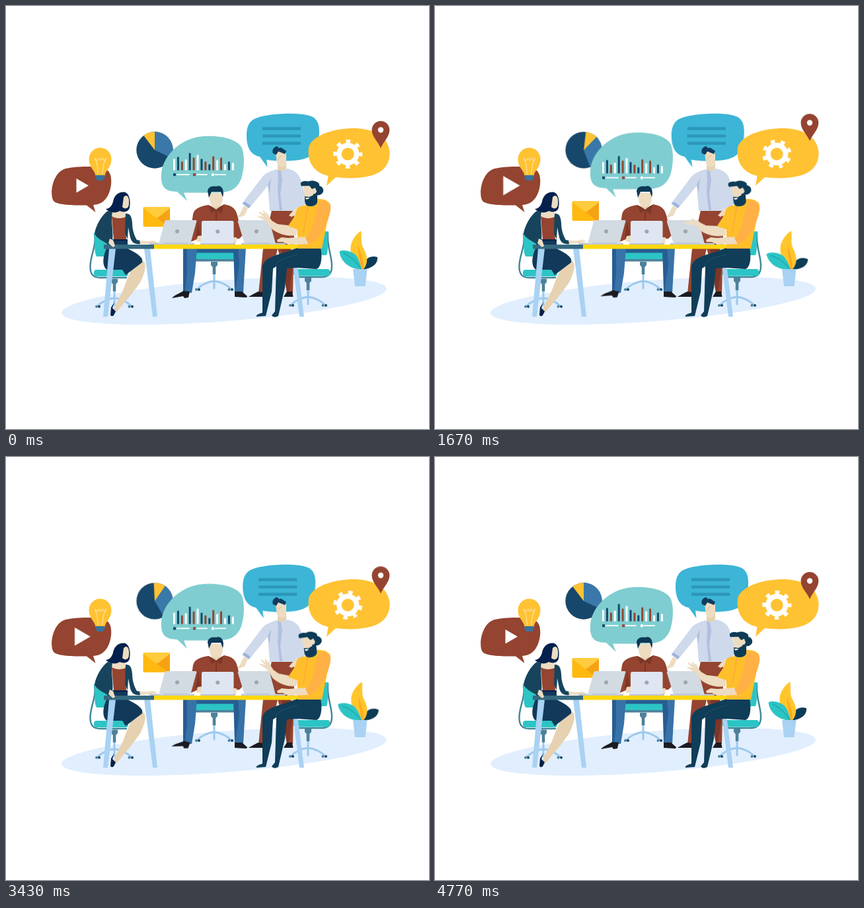
Animation, 640 px wide and 640 px high, one loop 4810 ms. Source, as an HTML page:

```html
<!DOCTYPE html>
<html lang="en">
<head>
<meta charset="utf-8">
<title>Team meeting</title>
<style>
html, body { margin: 0; width: 100%; height: 100%; overflow: hidden; background: #fff; }
svg { display: block; width: 100%; height: 100%; }
:root {
  --loop: 4810ms;
  --sine: cubic-bezier(.364, 0, .636, 1);
}
.sway, .drift, .nod, .arm, .finger { transform-box: view-box; }
.sway { animation: sway var(--loop) var(--sine) infinite; }
.drift { animation: drift var(--loop) var(--sine) infinite; }
.nod { animation: sway calc(var(--loop) / 2) var(--sine) infinite; }
.arm { transform-origin: 440px 344px; animation: arm var(--loop) ease-in-out infinite; }
.finger { transform-origin: 401px 325px; animation: pinch var(--loop) ease-in-out infinite; }
.rays line { stroke-dasharray: 1 2; animation: rays var(--loop) linear infinite; }
@keyframes sway { 50% { transform: var(--to); } }
@keyframes drift { 53% { transform: var(--to); } }
@keyframes arm {
  0%, 100% { transform: rotate(0deg); }
  22%, 46% { transform: rotate(-4deg); }
  60%, 72% { transform: rotate(5deg); }
  87% { transform: rotate(2.5deg); }
}
@keyframes pinch {
  0%, 10%, 60%, 100% { transform: rotate(0deg); }
  22%, 47% { transform: rotate(var(--fold)); }
}
@keyframes rays {
  0%, 37% { stroke-dashoffset: 1; opacity: 0; }
  37.1% { stroke-dashoffset: 1; opacity: 1; }
  43%, 50% { stroke-dashoffset: 0; opacity: 1; }
  56.9% { stroke-dashoffset: -1; opacity: 1; }
  57%, 100% { stroke-dashoffset: -1; opacity: 0; }
}
.red { fill: #944430; } .navy { fill: #17476a; } .ink { fill: #04214d; }
.gold { fill: #ffc233; } .skin { fill: #eddcc1; } .tan { fill: #e6d2b1; }
.teal { fill: #2cc4c5; } .sky { fill: #a9d2f3; } .shirt { fill: #ced9ec; }
.denim { fill: #3772a8; } .shade { fill: #275d92; } .white { fill: #fff; } .shoe { fill: #1b1b22; }
.line { fill: none; stroke-linecap: round; stroke-linejoin: round; }
</style>
</head>
<body>
<svg viewBox="0 0 640 640" preserveAspectRatio="none">
<defs>
  <g id="base">
    <path class="line" stroke="#9cc9ed" stroke-width="3" d="M0 -41V-2M0 -13C-10 -12 -21 -6 -25 -1M0 -13C10 -12 21 -6 25 -1"/>
    <path fill="#4d819b" d="M-5 -42H5V-37L2.3 -34V-23H-2.3V-34L-5 -37Z"/>
    <g class="navy"><circle cx="-23" r="2"/><circle cx="27" r="2"/></g>
    <g fill="#4d819b"><circle cx="-27" r="2"/><circle cx="22.500" r="2"/></g>
  </g>
</defs>

<ellipse fill="#e1eefe" cx="330" cy="446" rx="246.500" ry="31" transform="rotate(-4.300 330 446)"/>

<!-- pie -->
<g class="sway" style="--to:rotate(56deg);transform-origin:225px 218px">
  <circle class="navy" cx="225" cy="218" r="27.700"/>
  <path fill="#3a78a9" d="M225 218V190.300A27.700 27.700 0 0 1 250 229.800Z"/>
  <path class="gold" d="M225 218L208.300 195.900A27.700 27.700 0 0 1 225 190.300Z"/>
</g>

<!-- text bubble -->
<g class="drift" style="--to:translateX(-8.500px)">
  <path fill="#3cb5d6" d="M373 172.500C386 163 441 159 462 167C475 172 475 188 473 203C470 222 462 231 439 233.500C424 235 408 235 394 232.500L395.500 244L384 228C369 225 364 212 364 196C364 186 366 178 373 172.500Z"/>
  <path stroke="#2b97ba" stroke-width="4.400" d="M388 185.500h58M388 196.600h58M388 207.700h58"/>
</g>

<!-- chart bubble -->
<path class="drift" style="--to:translateY(-7.300px)" fill="#7fcdd0" d="M291 198C318 194 350 200 357 215C362 229 360 248 356 261C350 276 341 282 320 282.500H269L274 295L259 281C240 281 234 273 235 255C236 228 262 203 291 198Z"/>
<g class="drift" style="--to:translateY(6.300px)">
  <g id="bars"></g>
  <path stroke="#fff" stroke-width="1.800" d="M258.500 255.200h19M288.500 255.200h16M316 255.200h17"/>
  <path class="navy" d="M253 253.200h4v4h-4z"/><path class="red" d="M283 253.200h4v4h-4z"/><path class="white" d="M311 253.200h4v4h-4z"/>
</g>

<!-- video bubble -->
<path class="red" d="M90 246C108 242 143 241 154 249C162 256 160 276 154 287C149 296 143 300 132 301L135.500 312L122 301.500C104 302 80 301 73 296C65 289 69 252 90 246Z"/>
<path class="white sway" style="--to:scale(1.460);transform-origin:115.500px 271.700px" d="M106.500 261L125 271.700L106.500 282.500Z"/>

<!-- bulb -->
<g class="rays line" stroke="#ffc02e" stroke-width="2.300" id="rays"></g>
<path class="gold" d="M135.500 257C135 249 125.500 245 125.500 231.500A17 17 0 0 1 159.500 231.500C159.500 245 150 249 149.500 257Z"/>
<path class="line" stroke="#ffe49b" stroke-width="1.100" d="M139.500 254L138 240L134.500 230L138 234L141 230L143.500 234L146 230L149 234L151.500 230L147.500 240L145.500 254"/>
<path fill="#3b719b" d="M135.500 256h14v4l-2.500 4h-9l-2.500 -4z"/>

<!-- settings bubble -->
<path class="gold" d="M458 214C461 200 484 188 516 185.500C546 183 578 192 580.500 221C581 241 570 254 544 258.500C531 261 512 261 499 259L485 272L487.500 257C466 252 455 236 458 214Z"/>
<g class="sway" fill="none" style="--to:rotate(90deg);transform-origin:517.200px 224px" stroke="#fff">
  <circle cx="517.200" cy="224" r="13.300" stroke-width="7.600"/>
  <circle cx="517.200" cy="224" r="18.700" stroke-width="6.600" stroke-dasharray="6.200 8.487" stroke-dashoffset="3.100"/>
</g>
<g class="sway" style="--to:translateY(-13.800px)">
  <path class="red" d="M567 215C563 205 553.500 198 553.500 187.500A13.300 13.300 0 0 1 580.300 187.500C580.300 198 571 205 567 215Z"/>
  <circle class="white" cx="567" cy="187.500" r="4.200"/>
</g>

<!-- envelope -->
<g class="drift" style="--to:translateY(-12.200px)">
  <rect x="207.500" y="304" width="40.500" height="30" rx="2" fill="#ffb90f"/>
  <path fill="#f6a313" d="M228 321L248 306V333L245 334Z"/>
  <path fill="#ffcc3d" d="M208 305.500Q208 304 210 304H246Q248 304 248 306L231 319Q228 321.500 225 319Z"/>
</g>

<!-- chairs -->
<use href="#base" x="164" y="454.800"/>
<use href="#base" x="457" y="453"/>
<use href="#base" x="315" y="429"/>
<g class="line" stroke="#3f8698" stroke-width="2.400">
  <path d="M134 345C137 364 128 376 127.500 393C127 407 133 411 142 411H182"/>
  <path d="M487 343C485 363 493 377 493 393C493 406 487 410 478 410H440"/>
</g>
<path class="teal" d="M133 344Q134 342 140 344L161 350L166 379H137C132 370 136 356 133 344Z"/>
<path class="teal" d="M474 345L480 341H488C485 355 489 367 485 377H470Z"/>
<rect class="teal" x="133" y="399" width="52" height="10" rx="4"/>
<rect class="teal" x="435" y="398" width="55" height="10.500" rx="4"/>

<!-- standing man -->
<g>
  <path class="red" d="M402 309H436V352L434 434H425L416 385L411 367L403 402L389 435H382L389 367Z"/>
  <path fill="#7d3627" d="M417 368H434L433 400L428 432H425Z"/>
  <path class="shoe" d="M367 440C372 437 379 433 382 432L389 433V440ZM420 440L425 432H433L434.500 440Z"/>
  <path class="tan" d="M411 236H424V252H411Z"/>
  <path class="shirt" d="M409 247L416 250L426 246C437 249 443 253 446 263L456 297L440 312L434 306L437 310H399L396 272L368 306L357 299L386 261C391 253 400 250 409 247Z"/>
  <path fill="#b1c0df" d="M411 248L416 250L418 263L415 285L418 309H414L411 280L412 260ZM396 271L401 260L399 283Z"/>
  <path fill="#9db3da" d="M358 299L361 296L370 302L367 306Z"/>
  <path class="skin" d="M360 302L366 306L361 317L355 319L349 321L343 320L353 316Z"/>
  <path class="skin" d="M440 304L447 309L440 315L432 319L428 317L435 309Z"/>
  <path class="skin" d="M407 222C410 218 421 217 424 224V237C423 245 414 245 411 240C408 233 410 228 407 222Z"/>
  <path class="line" stroke="#d9bb91" d="M417 227Q412 228 412 232"/>
  <path fill="#113d60" d="M404 223C402 217 405 214 410 212L413 215C418 213 420 218 424 219L422 224L412 220L409 225Z"/>
</g>

<!-- seated man, middle -->
<g>
  <path class="shade" d="M284 366H348V375H284Z"/>
  <rect class="teal" x="285" y="373.500" width="62" height="10.500" rx="3"/>
  <path fill="#4d819b" d="M287 383h58v3.500h-58z"/>
  <path class="denim" d="M268 365H289L286 404L281 434L268 433Z"/>
  <path class="shade" d="M268 366H274L274 404L271 433H268Z"/>
  <path class="denim" d="M344 365H363L359 434H346Z"/>
  <path class="shade" d="M344 367L351 366L353 390L347 433Z"/>
  <path class="shoe nod" style="--to:rotate(9deg);transform-origin:278px 437px" d="M251 442C255 437 265 434 268 431L278 432L276 441L270 442L268 439Z"/>
  <path class="shoe" d="M346 440V432H357L365 439Q365 441 362 441Z"/>
  <path class="red" d="M306 301L318 307L330 300C342 302 348 307 350 317L358 347L353 352H291L277 358L283 315C285 306 294 303 306 301Z"/>
  <path fill="#7d3627" d="M306 301L318 307L329 301L326 314L318 309L311 313ZM317 309h2v17h-2zM287 350L291 324L295 350Z"/>
  <path class="tan" d="M311 294H325V302L318 308L311 303Z"/>
  <path class="skin" d="M306 283H329L327 297C325 306 310 306 309 297Z"/>
  <path fill="#0d3856" d="M307 290L305 280C306 273 313 272 318 273C326 270 331 278 328 289L325 281H311Z"/>
  <path class="skin" d="M290 348L298 347V358L288 356ZM344 350H349L348 359H342Z"/>
</g>

<!-- seated woman -->
<g>
  <path class="tan" d="M193 391L208 386C214 391 209 407 203 418C194 432 180 448 170 460L163 466C162 455 170 445 177 430C181 418 187 404 193 391Z"/>
  <path class="ink" d="M164 448L161 457L166 462L163 468Q159 471 158 467L159 456Z"/>
  <path fill="#12395a" d="M154 354H184V367C197 374 209 380 206 388L181 407L176 399H153C146 395 145 381 153 365Z"/>
  <path class="red" d="M160 318L181 316L182 354H163Z"/>
  <path class="skin" d="M168 304H180L181 319C175 322 166 322 160 318L162 312Z"/>
  <path fill="#17445c" d="M154 310L161 312C158 324 163 340 161 354L153 357L149 342L159 354L155 361C146 355 136 351 134 344C136 332 145 316 154 310ZM181 314C188 314 190 318 191 328C191 340 195 349 198 354L204 355L203 360C195 361 190 358 188 350L185 335L184 353L180 344Z"/>
  <path class="ink" d="M161 353h23v2.200h-23z"/>
  <path class="ink" d="M179 281.500C168 281 163 289 162 296C160 303 156 307 151 307C156 313 167 314 172 310C176 312 185 313 187 305C189 296 187 283 179 281.500Z"/>
  <path class="skin" d="M178 289C184 283 187 291 186 299C186 307 180 308 176 304Z"/>
</g>

<!-- table -->
<path class="sky" d="M156 367H166L154 470H147ZM209 367H218L229 470H222ZM431 367H438L451 470H444Z"/>
<path fill="#35697f" d="M148 361h76v6.500h-76z"/>
<path fill="#ffd80e" d="M224 361h217v6.500h-217z"/>
<path class="skin" d="M157 352L162 354L165 363L162 365L155 359Z"/>
<path class="skin sway" style="--to:rotate(-5deg);transform-origin:201px 358px" d="M202 355L214 356L223 355L230 358L220 360H203Z"/>

<!-- laptops -->
<path fill="#bcc4d0" d="M216 358.500H285V361H218ZM294 358.500H347V361H294ZM356 358.500H424L422 361H356Z"/>
<path fill="#d2dae2" d="M243 324H287Q289 324 288 327L279 360H231L240 326Q241 324 243 324ZM353 324H396Q398 324 399 326L408 360H361L351 327Q350 324 353 324Z"/>
<path fill="#b7c1cf" d="M238 358h37v1.200h-37zM363 358h37v1.200h-37z"/>
<rect x="296" y="325" width="48.500" height="33.500" rx="2.500" fill="#dfe6f2"/>
<g fill="#9fa5ae"><circle cx="259" cy="341" r="3"/><circle cx="320.300" cy="341.300" r="3"/><circle cx="379" cy="341" r="3"/></g>

<!-- seated man, right -->
<g>
  <path fill="#103d58" d="M441 366H476C479 380 477 397 469 398L440 396L425 397L422 426L412 469Q405 473 402 468L407 462L409 394L404 397L402 432L393 469L379 470Q377 467 388 464V395C389 381 409 377 424 372Z"/>
  <path class="line" stroke="#2a5871" stroke-width=".8" d="M408 394C409 384 425 380 441 376"/>
  <path class="skin" d="M450 289H468V305L455 302Z"/>
  <g class="arm">
    <path class="skin" d="M399 323L411 330L428 332L441 337L440 347C427 349 414 346 403 338L395 327Z"/>
    <path class="skin finger" style="--fold:-20deg" d="M401 323L391 319L381 317.500L382 319.500L391 324L398 330Z"/>
    <path class="skin finger" style="--fold:-34deg" d="M402 324L393 316L383.500 311L383 313L391 320L398 328Z"/>
    <path class="skin finger" style="--fold:-44deg" d="M402 325L395 316L390 309.500L388.500 310L392 318L398 327Z"/>
    <path class="skin finger" style="--fold:-30deg" d="M400 328L398 318L395 313L393.500 314L395 321Z"/>
  </g>
  <path fill="#ffbf2b" d="M452 302C457 295 466 291 474 292C484 292 491 297 491 302L478 367H441V338L427 333C431 325 438 319 440 308C442 304 446 302 452 302Z"/>
  <path fill="#ffae36" d="M455 305L458 303L451 343H449Z"/>
  <path class="skin" d="M457 349L440 350L427 351L417 350L410 354L411 357L419 357L427 361L459 360Z"/>
  <path fill="#ffb145" d="M476 295C486 293 493 300 491 309C488 326 480 342 470 353L458 361L453 351C464 343 467 316 471 301Z"/>
  <g class="nod" style="--to:rotate(-6.500deg);transform-origin:462px 301px">
    <path class="skin" d="M450 273C457 268 467 272 470 278L468 293H453Z"/>
    <path fill="#0e3b57" d="M447 272.500Q444 267 449 265.500Q453 264 457 265.500Q465 263 470 266Q475 268 474 272Q481 274 480 281Q477 287 471 286V297Q469 303 460 303Q452 303 452 294V288L459 289L465 286V279L469 279L468 275L463 277L459 272Z"/>
    <path fill="#fff" d="M453 290H459Q458 293 454 292.500Z"/>
    <path class="skin" d="M465 278Q469 276 470 280Q469 285 465 284Z"/>
  </g>
</g>

<!-- plant -->
<path class="sway" style="--to:rotate(10deg);transform-origin:540px 398px" fill="#0d3c56" d="M539 399C540 386 548 376 562 380C563 391 553 397 539 399Z"/>
<g class="sway" style="--to:rotate(2.500deg);transform-origin:537px 398px">
  <path fill="#ffc62c" d="M536 399C525 387 518 371 523 358C527 348 532 344 537 340C539 349 536 358 541 367C548 379 548 391 540 399Z"/>
  <path fill="#ffa91f" d="M538 399C537 386 531 373 533 362C535 373 543 385 540 399Z"/>
</g>
<g class="sway" style="--to:rotate(-9deg);transform-origin:537px 398px">
  <path class="teal" d="M538 399C522 398 507 389 504.500 372Q505 370 508 370C517 369 528 373 532 381C535 387 537 393 538 399Z"/>
  <path class="line" stroke="#168f98" stroke-width="1" d="M511 374C522 379 531 388 537 398"/>
</g>
<path class="sky" d="M525 398H546.500L543.500 424H528Z"/>
</svg>
<script>
const NS = 'http://www.w3.org/2000/svg';
function add(parent, tag, attrs) {
  const el = document.createElementNS(NS, tag);
  for (const key in attrs) el.setAttribute(key, attrs[key]);
  document.getElementById(parent).append(el);
}

const tones = { w: 'white', n: 'navy', r: 'red' };
const heights = [17, 20, 13, 16, 26, 19, 23, 17, 13, 9, 21, 15, 19, 9, 13, 11];
[...'wnrwnrwnrnrwrwnw'].forEach((tone, i) => add('bars', 'rect', {
  class: tones[tone], x: 253 + i * 5.92, y: 248.5 - heights[i], width: 3, height: heights[i]
}));

for (const deg of [-44, -22, 0, 22, 44]) {
  const a = deg * Math.PI / 180, dx = Math.sin(a), dy = -Math.cos(a);
  add('rays', 'line', {
    x1: 142.5 + dx * 18.5, y1: 231 + dy * 18.5,
    x2: 142.5 + dx * 25.5, y2: 231 + dy * 25.5, pathLength: 1
  });
}
</script>
</body>
</html>
```
